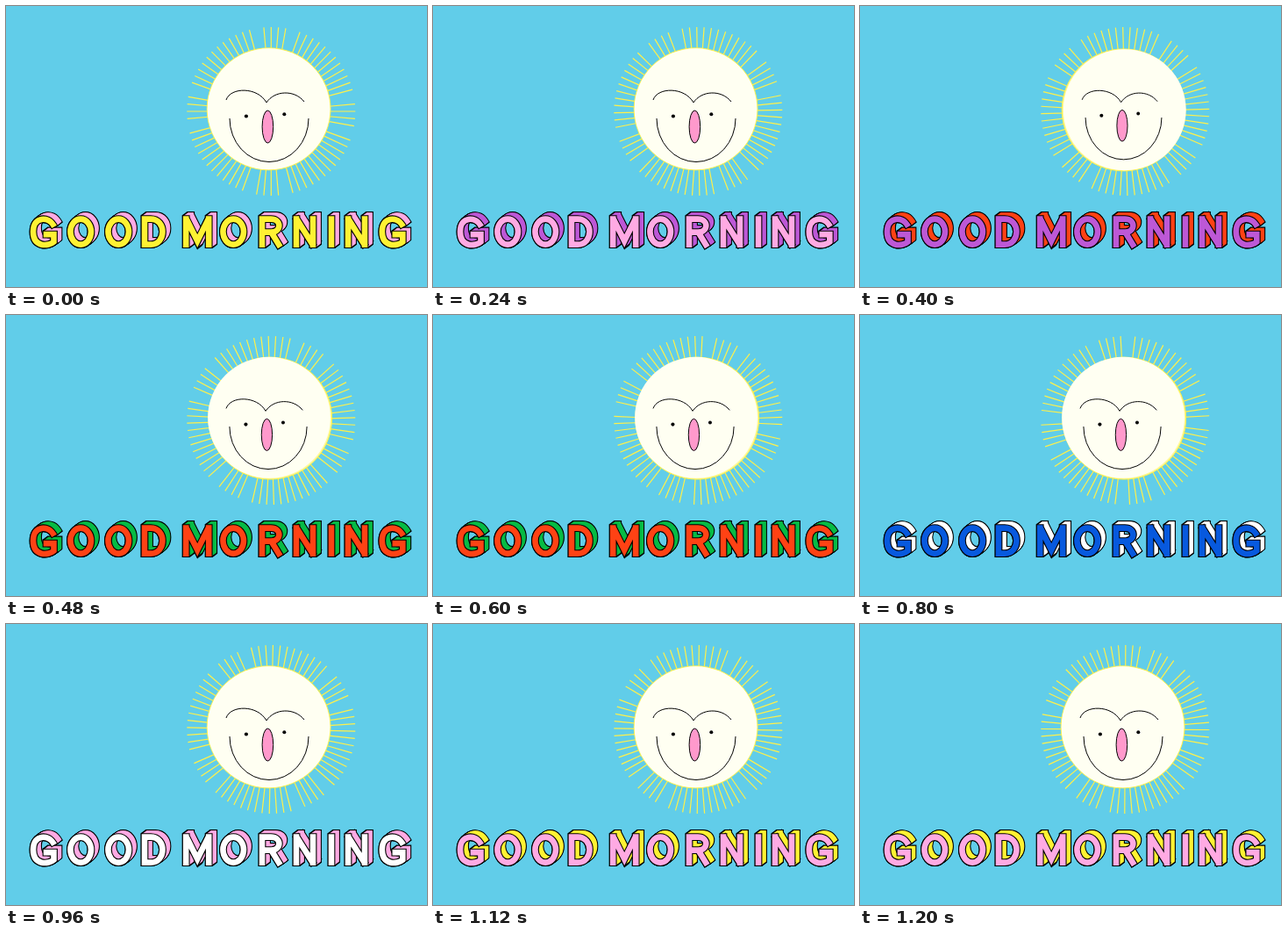
Recreate the animation shown at these times as an HTML page with a canvas. Size 480x320 px, loop 1280 ms.

```html
<!DOCTYPE html>
<html lang="en">
<head>
<meta charset="utf-8">
<title>Good morning</title>
<style>
html, body { margin: 0; width: 100%; height: 100%; overflow: hidden; background: #61cde9; }
canvas { display: block; }
</style>
</head>
<body>
<canvas id="stage" width="480" height="320" role="img" aria-label="GOOD MORNING"></canvas>
<script>
const ctx = document.getElementById('stage').getContext('2d');
const LOOP = 1280;
const TURN = Math.PI * 2;

// Letter skeletons, 29 units tall
const O = 'M0 14.5A11.8 14.5 0 1 1 23.6 14.5A11.8 14.5 0 1 1 0 14.5Z';
const G = 'M22.5 6C18 -2 0 -4 0 14.5C0 33 18 31 23.5 26V17.5H15';
const D = 'M0 29V0H7C25 0 25 29 7 29Z';
const M = 'M0 29V0M26 29V0M1.5 2L13 25L24.5 2';
const R = 'M0 29V0H10C22.5 0 22.5 15 10 15H2M11 16L19 29';
const N = 'M0 29V0M19 29V0M1 1L18 28';
const I = 'M0 29V0';
const letters = [
  [G, 31], [O, 73.4], [O, 116.4], [D, 158], [M, 205.2], [O, 247.4],
  [R, 292], [N, 331], [I, 371], [N, 390], [G, 428.8]
].map(([d, x]) => ({ path: new Path2D(d), x }));

// The side of each word takes the next face colour
const colors = ['#fff233', '#ffaae3', '#bd58d6', '#ff4214', '#07bb45', '#0759de', '#ffffff', '#ffaae3'];

const poses = {
  rest:  { body: [299.5, 117.3], under: [299.6, 117.3], face: [0, 0, 1] },
  left:  { body: [300, 116.8], under: [301.2, 117.6], face: [-1, -1, 0.98] },
  right: { body: [301.8, 118.2], under: [300.6, 118.4], face: [0.5, -1, 0.965] }
};
const brows = new Path2D('M251 107C256 92 287 92 297 110C306 96 329 95 340 109');
const smile = new Path2D('M255 128A45 49.5 0 0 0 345 128');

function disc(x, y, rx, ry, fill) {
  ctx.beginPath();
  ctx.ellipse(x, y, rx, ry, 0, 0, TURN);
  ctx.fillStyle = fill;
  ctx.fill();
}

function line(path, x, y, color, width) {
  ctx.save();
  ctx.translate(x, y);
  ctx.strokeStyle = color;
  ctx.lineWidth = width;
  ctx.stroke(path);
  ctx.restore();
}

function drawRays(t) {
  const shift = -10.3125 * Math.floor(t / 80);
  ctx.beginPath();
  for (let deg = 0; deg < 360; deg += 5) {
    if (deg % 90 === 15 || deg % 90 === 80) continue;
    const a = (deg + shift) * TURN / 360;
    const sx = Math.sin(a), sy = -Math.cos(a);
    ctx.moveTo(302.3 + 66 * sx, 120 + 66 * sy);
    ctx.lineTo(302.3 + 96 * sx, 120 + 96 * sy);
  }
  ctx.strokeStyle = '#fff04a';
  ctx.lineWidth = 1.2;
  ctx.stroke();
}

function poseAt(t) {
  if (t < 400 || t >= 840) return poses.rest;
  return Math.floor((t - 360) / 80) % 2 ? poses.left : poses.right;
}

function drawSun(t) {
  const { body, under, face: [dx, dy, k] } = poseAt(t);
  drawRays(t);
  disc(...under, 70.4, 69.5, '#fff9a0');
  ctx.strokeStyle = '#fff04a';
  ctx.lineWidth = 1;
  ctx.stroke();
  disc(...body, 69.9, 69, '#fffff2');

  ctx.save();
  ctx.translate(300 + dx, 130 + dy);
  ctx.scale(k, k);
  ctx.translate(-300, -130);
  line(brows, 0, 0, '#000', 1);
  line(smile, 0, 0, '#000', 1);
  disc(273.9, 125.5, 2.1, 2.1, '#000');
  disc(317.3, 123.3, 2, 2, '#000');
  disc(298.4, 137.5, 6.3, 18.5, '#ff99cc');
  ctx.strokeStyle = '#000';
  ctx.lineWidth = 1;
  ctx.stroke();
  ctx.restore();
}

function drawWords(t) {
  const i = Math.floor(t / 160);
  const face = colors[i], side = colors[(i + 1) % colors.length];
  const y = 242.6;
  ctx.lineCap = 'square';
  for (const { path, x } of letters) {
    for (const [color, width] of [['#000', 8.8], [side, 6.6]])
      for (let d = 5.5; d >= 0; d -= 0.5) line(path, x + d, y - d * 0.75, color, width);
    line(path, x, y, '#000', 8.8);
    line(path, x, y, face, 6.6);
  }
  ctx.lineCap = 'butt';
}

function draw(now) {
  const t = now % LOOP;
  ctx.fillStyle = '#61cde9';
  ctx.fillRect(0, 0, 480, 320);
  drawSun(t);
  drawWords(t);
  requestAnimationFrame(draw);
}
requestAnimationFrame(draw);
</script>
</body>
</html>
```
